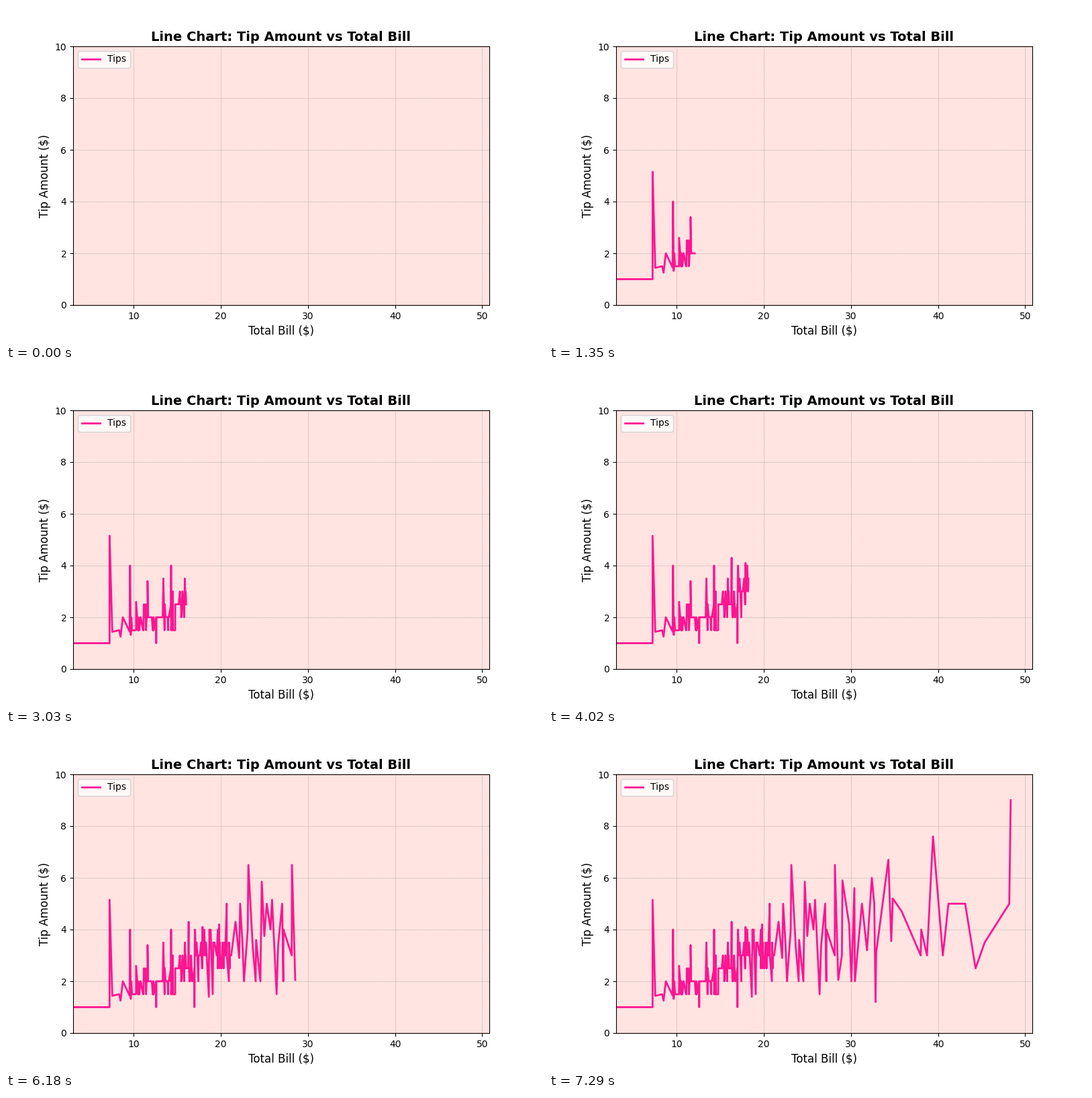
Animation of 800x500 px, one loop 7.32 s. Source, as a matplotlib script:

```python
import numpy as np
import matplotlib.pyplot as plt
from matplotlib.animation import FuncAnimation

FRAMES = 244
BAND = (16, 171)  # steps that draw the crowded middle of the curve

# Corners (bill, tip) before the band, tall swings in it, corners after it.
opening = [(3.07, 1), (7.25, 1), (7.25, 5.15), (7.56, 1.44), (8.35, 1.5),
           (8.51, 1.25), (8.77, 2), (9.55, 1.45), (9.6, 4), (9.68, 1.32)]
swings = [(10.29, 2.6), (11.61, 3.4), (12.6, 1), (13.42, 3.5), (14.31, 4),
          (16.32, 4.3), (16.99, 1), (17.92, 4.1), (18.64, 1.4), (18.71, 4),
          (19.08, 1.5), (19.81, 4.2), (20.69, 5), (21.7, 4.3), (22.12, 2.9),
          (22.23, 5), (22.49, 3.5)]
ending = [(22.67, 2), (23.1, 4), (23.17, 6.5), (23.68, 3.3), (24.01, 2),
          (24.06, 3.6), (24.55, 2), (24.71, 5.85), (25, 3.75), (25.28, 5),
          (25.71, 4), (25.89, 5.15), (26.41, 1.5), (26.59, 3.4), (27.05, 5),
          (27.18, 2), (27.2, 4), (28.15, 3), (28.17, 6.5), (28.55, 2.05),
          (28.97, 3), (29.03, 5.9), (29.8, 4.2), (30.06, 2), (30.4, 5.6),
          (30.46, 2), (31.27, 5), (31.85, 3.2), (32.4, 6), (32.68, 5),
          (32.83, 1.2), (32.9, 3.1), (34.3, 6.7), (34.63, 3.55), (34.81, 5.2),
          (35.83, 4.7), (38.01, 3), (38.07, 4), (38.73, 3), (39.42, 7.6),
          (40.55, 3), (41.19, 5), (43.11, 5), (44.3, 2.5), (45.35, 3.5),
          (48.17, 5), (48.33, 9)]


def spread(points, first, last, power=1.0):
    """Place corners on whole steps and fill the steps between them."""
    u = np.linspace(0, 1, len(points)) ** power
    at = np.round(first + (last - first) * u)
    steps = np.arange(first, last + 1)
    return [np.interp(steps, at, values) for values in zip(*points)]


def band(rng):
    """Scatter clustered bills whose tips rise and mostly sit on half dollars."""
    count = BAND[1] - BAND[0] + 1 - len(swings)
    u = np.linspace(0, 1, count) + rng.uniform(-0.012, 0.012, count)
    bill = np.interp(u, [0, 0.35, 0.8, 1], [9.75, 13.8, 18.3, 21.2])
    centre = np.interp(bill, [10, 13.5, 16, 17], [1.7, 2, 2.5, 3])
    noise = rng.normal(0, 1, count).clip(-1.6, 1.6)
    tip = np.round(2 * (centre + noise * np.interp(bill, [10, 16], [0.25, 0.5]))) / 2
    x, y = np.vstack([np.column_stack([bill, tip]), swings]).T
    order = np.argsort(x, kind="stable")
    return x[order], y[order]


parts = [spread(opening, 1, BAND[0] - 1),
         band(np.random.default_rng(11)),
         spread(ending, BAND[1] + 1, FRAMES - 1, power=0.83)]
bills, tips = np.hstack(parts)

fig, ax = plt.subplots(figsize=(8, 5), dpi=100)
ax.set_facecolor("mistyrose")
ax.set_xlim(3.07, 50.81)
ax.set_ylim(0, 10)
ax.set_title("Line Chart: Tip Amount vs Total Bill", fontsize=14, fontweight="bold")
ax.set_xlabel("Total Bill ($)", fontsize=12)
ax.set_ylabel("Tip Amount ($)", fontsize=12)
ax.grid(True, color="gray", linestyle=":", linewidth=0.5)
line, = ax.plot([], [], color="deeppink", linewidth=2, label="Tips")
ax.legend(loc="upper left")


def update(i):
    line.set_data(bills[:i], tips[:i])
    return line,


anim = FuncAnimation(fig, update, frames=FRAMES, interval=30,
                     repeat=True, repeat_delay=0)
plt.show()
```
